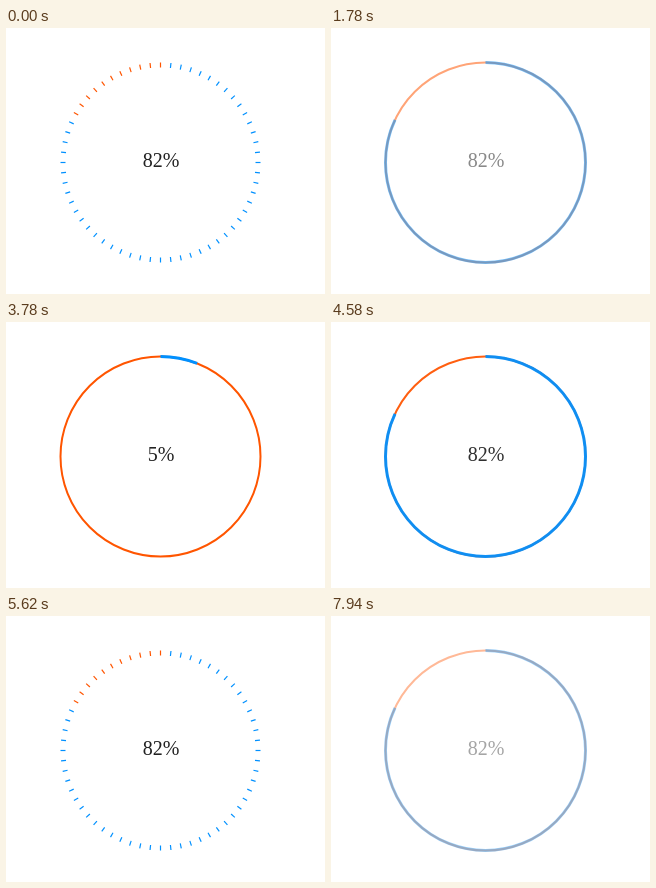
Animation, 319 px wide and 266 px high, one loop 8 s. Source, as an HTML page with a canvas:

```html
<!DOCTYPE html>
<html lang="en">
<head>
<meta charset="utf-8">
<title>Progress ring</title>
<style>
  html, body { margin: 0; width: 100%; height: 100%; overflow: hidden; background: #fff; }
  canvas { display: block; }
</style>
</head>
<body>
<canvas id="stage" width="319" height="266"></canvas>
<script>
const ctx = document.getElementById('stage').getContext('2d');
const LOOP = 8000, STEP = 80, OFFSET = 20;
const STARTS = [500, 3620, 6580];   // when the ring replaces the ticks
const RUN = 2000;                   // ring time before the ticks return
const COUNT = 920, FADE_AT = 800, FADE = 1000;
const GOAL = 82, TICKS = 60, CX = 154.5, CY = 134.5, R = 100;
const BLUE = '#0090ff', ORANGE = '#ff5500';

const swing = p => 0.5 - Math.cos(Math.PI * Math.min(1, Math.max(0, p))) / 2;
const turn = part => (part - 0.25) * 2 * Math.PI;

function label(value) {
  ctx.font = '20px "Liberation Serif", "Times New Roman", serif';
  ctx.textAlign = 'center';
  ctx.fillStyle = '#222';
  ctx.fillText(Math.floor(value) + '%', CX + 0.5, 139);
}

function arc(part, color, width) {
  ctx.beginPath();
  ctx.arc(CX, CY, R, turn(0), turn(part));
  ctx.strokeStyle = color;
  ctx.lineWidth = width;
  ctx.stroke();
}

function drawTicks() {
  ctx.lineWidth = 1.2;
  for (let i = 1; i <= TICKS; i++) {
    const a = turn(i / TICKS), x = Math.cos(a), y = Math.sin(a);
    ctx.beginPath();
    ctx.moveTo(CX + x * 95, CY + y * 95);
    ctx.lineTo(CX + x * R, CY + y * R);
    ctx.strokeStyle = i / TICKS * 100 <= GOAL ? BLUE : ORANGE;
    ctx.stroke();
  }
  label(GOAL);
}

function drawRing(age) {
  const value = GOAL * swing(age / COUNT);
  ctx.globalAlpha = 1 - swing((age - FADE_AT) / FADE);
  arc(1, ORANGE, 2);
  if (value > 0) arc(value / 100, BLUE, 3);
  label(value);
  ctx.globalAlpha = 1;
}

function draw(now) {
  const time = now % LOOP;
  const t = Math.floor((time - OFFSET) / STEP) * STEP + OFFSET;
  const start = STARTS.find(s => t >= s && t < s + RUN);
  ctx.fillStyle = '#fff';
  ctx.fillRect(0, 0, 319, 266);
  if (start === undefined) drawTicks();
  else drawRing(t - start);
}

let origin;
function frame(now) {
  origin ??= now;
  draw(now - origin);
  requestAnimationFrame(frame);
}
draw(0);
requestAnimationFrame(frame);
</script>
</body>
</html>
```
